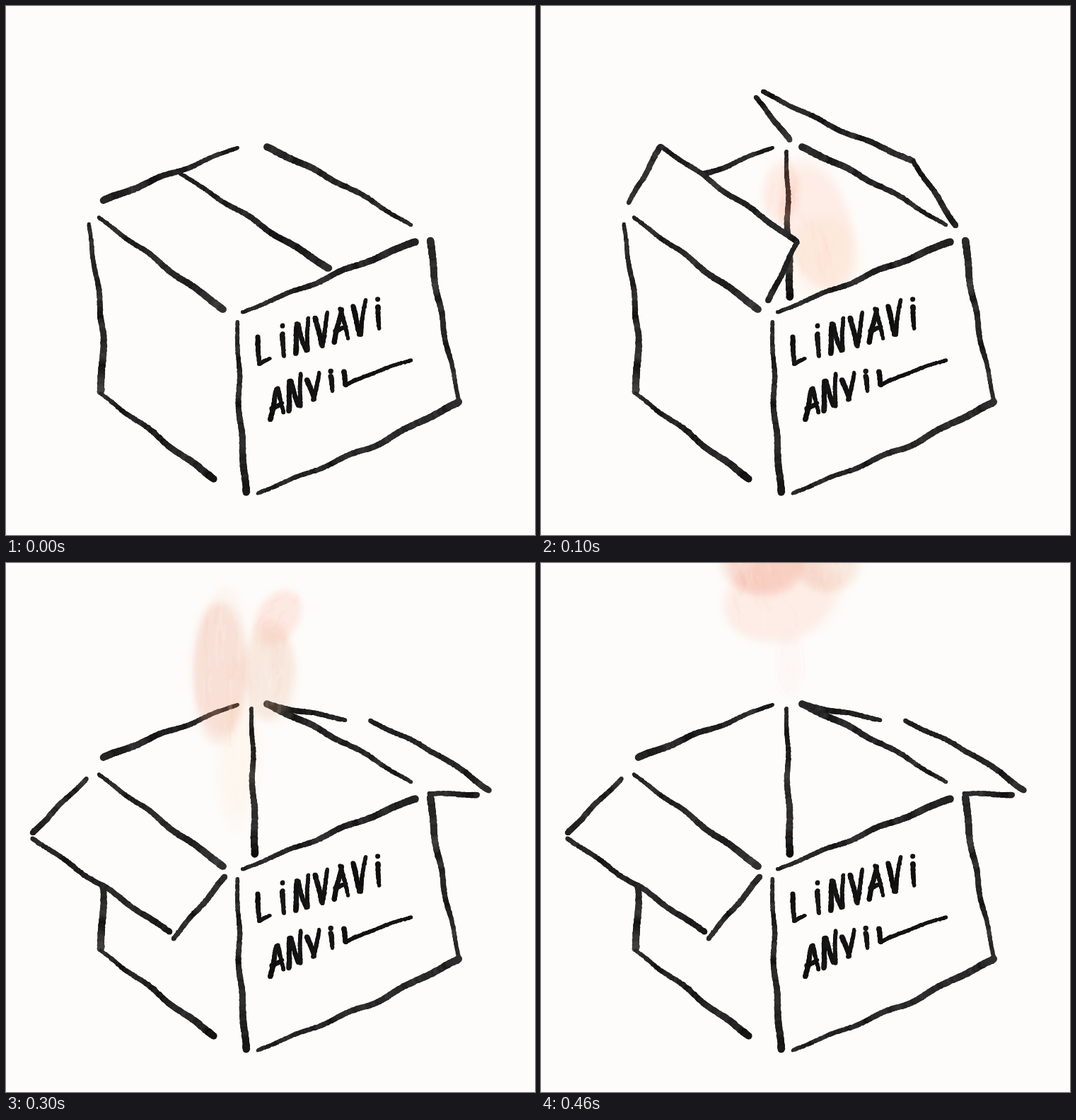
These frames come from a looping animation (748 by 748 pixels, 0.5 s). An HTML page with a canvas:

```html
<!DOCTYPE html>
<html lang="en">
<head>
<meta charset="utf-8">
<title>Opening box</title>
<style>
  html, body { margin: 0; height: 100%; overflow: hidden; background: #fdfcfa; }
  canvas { display: block; }
</style>
</head>
<body>
<canvas id="stage" width="748" height="748" role="img" aria-label="A box marked Linvavi Anvil opens"></canvas>
<script>
const SIZE = 748, STEP = 100, PAPER = '#fdfcfa';

// Brush lines as x, y pairs, from the thin end to the thick end.
const back = [
  [328,200, 137,275],
  [573,310, 480,254, 369,199],
  [117,308, 138,460, 134,546]
];
const front = [
  [131,299, 307,429],
  [335,433, 579,333],
  [134,548, 294,669],
  [327,447, 331,590, 340,688],
  [640,557, 610,412, 600,331],
  [356,689, 520,622, 640,560]
];
const seam = [245,236, 456,371], inner = [347,206, 352,412], hinge = [307,429, 131,299];

// The left lines run around the flap, so they also outline what it hides.
const closed = { left: [], right: [] };
const ajar = {
  left: [[124,278, 169,198], [169,198, 362,333], [362,334, 321,417]],
  right: [[314,121, 400,165, 526,219], [304,129, 352,189], [526,219, 586,310]]
};
const wide = {
  left: [[118,283, 73,201], [79,198, 267,329], [267,329, 312,427]],
  right: [[438,107, 362,184], [453,107, 676,236], [673,239, 602,316]]
};
const folded = {
  left: [[114,305, 37,382], [38,390, 232,522], [237,531, 309,444]],
  right: [[480,222, 369,200], [515,223, 615,272, 683,322], [598,326, 667,328]]
};
const poses = [closed, ajar, wide, folded, folded];

// Smoke dabs: x, y, half width, half height, tilt, strength.
const smoke = [
  [],
  [[340,262, 28,48, 0.1, .13], [388,310, 48,95, -0.25, .13], [405,360, 55,65, 0, .08]],
  [[340,155, 30,38, 0, .05], [348,210, 52,52, 0, .14], [325,280, 45,80, 0.3, .12],
   [388,320, 60,90, -0.3, .11]],
  [[306,150, 38,107, 0, .3], [386,78, 30,46, 0.6, .2], [372,155, 38,70, 0, .22],
   [330,280, 30,95, 0, .05]],
  [[312,2, 56,44, 0, .4], [405,5, 46,36, 0, .22], [345,48, 86,60, -0.2, .14],
   [352,140, 20,48, 0, .035]]
];

// Hand lettering on a unit square.
const glyphs = {
  L: [[0,1, 0.1,0, 0.9,0.1]],
  I: [[0.4,0.75, 0.5,0], [0.4,1, 0.45,1]],
  N: [[0,0, 0.1,1, 0.8,0, 0.9,1.1]],
  V: [[0,1, 0.5,0, 0.9,1.1]],
  A: [[0,0, 0.5,1, 1,0], [0.1,0.35, 0.9,0.4]]
};

function seeded(seed) {
  return () => (seed = (seed * 16807 + 11) % 2147483647) / 2147483647;
}

function tracePolygon(g, pts) {
  g.beginPath();
  for (let i = 0; i < pts.length; i += 2) g.lineTo(pts[i], pts[i + 1]);
  g.closePath();
}

// A rough brush line: overlapping dabs that waver in place, size and tone.
function ink(g, pts, w0, w1, tone = 38, spread = 26) {
  const random = seeded(Math.round(pts[0] * 751 + pts[1] * 13) + 7);
  const phase = random() * 6, lengths = [];
  for (let i = 2; i < pts.length; i += 2)
    lengths.push(Math.hypot(pts[i] - pts[i - 2], pts[i + 1] - pts[i - 1]));
  const total = lengths.reduce((a, b) => a + b), waver = Math.min(1.7, total / 80);
  let done = 0, shade = tone;
  lengths.forEach((length, k) => {
    const [x0, y0, x1, y1] = pts.slice(2 * k, 2 * k + 4);
    const dx = (x1 - x0) / length, dy = (y1 - y0) / length;
    for (let d = 0; d < length; d += 0.9) {
      const s = done + d, width = w0 + (w1 - w0) * s / total;
      const off = waver * Math.sin(s / 14 + phase) * Math.sin(Math.PI * s / total);
      shade += (tone - shade) * 0.1 + (random() - 0.5) * spread * 0.5;
      const v = Math.max(12, shade | 0);
      g.fillStyle = `rgb(${v},${v},${v})`;
      g.beginPath();
      g.arc(x0 + dx * d - dy * off + (random() - 0.5) * 0.9,
            y0 + dy * d + dx * off + (random() - 0.5) * 0.9,
            width / 2 + (random() - 0.5) * 0.7, 0, 7);
      g.fill();
    }
    done += length;
  });
}

// Letters climb along a slope, from height h0 to h1.
function letter(g, word, x, y, slope, advance, h0, h1) {
  const random = seeded(word.length * 41);
  [...word].forEach((char, i) => {
    const height = (h0 + (h1 - h0) * i / (word.length - 1)) * (0.92 + random() * 0.2);
    const left = x + i * advance, width = advance * 0.72;
    glyphs[char].forEach(stroke => {
      const pts = stroke.map((v, j) => j % 2
        ? y + slope * (i * advance + stroke[j - 1] * width) - v * height
        : left + v * width);
      ink(g, pts, 7, 5, 20, 10);
    });
  });
}

// A soft watercolour dab: layered ellipses with dry brush streaks.
function wash(g, [x, y, rx, ry, tilt, strength]) {
  const random = seeded(x * 97 + y * 31 + 5), around = n => (random() - 0.5) * n;
  g.save();
  g.translate(x, y);
  g.rotate(tilt);
  g.filter = 'blur(4px)';
  g.fillStyle = `rgba(234,158,125,${strength / 5})`;
  for (let i = 0; i < 5; i++) {
    g.beginPath();
    g.ellipse(around(rx * 0.3), around(ry * 0.2), rx * (0.85 + random() * 0.2),
              ry * (0.85 + random() * 0.2), around(0.2), 0, 7);
    g.fill();
  }
  g.filter = 'blur(1px)';
  g.lineCap = 'round';
  for (let i = 0; i < 18; i++) {
    const a = random() * 6.28, r = Math.sqrt(random()) * 0.85;
    const sx = Math.cos(a) * r * rx, sy = Math.sin(a) * r * ry, reach = ry * (0.1 + random() * 0.2);
    g.strokeStyle = i % 2 ? `rgba(234,158,125,${strength * 0.22})` : `rgba(253,252,250,${strength * 0.6})`;
    g.lineWidth = 1 + random() * 5;
    g.beginPath();
    g.moveTo(sx, sy - reach);
    g.quadraticCurveTo(sx + around(14), sy, sx + around(12), sy + reach);
    g.stroke();
  }
  g.restore();
}

function paint(pose, index) {
  const sheet = document.createElement('canvas');
  sheet.width = sheet.height = SIZE;
  const g = sheet.getContext('2d');
  const edges = lines => lines.forEach(pts => ink(g, pts, 5, 10));
  const flap = lines => lines.forEach(pts => ink(g, pts, 6, 8));
  g.fillStyle = PAPER;
  g.fillRect(0, 0, SIZE, SIZE);

  edges([...back, index ? inner : seam]);
  flap(pose.right);

  g.save();
  tracePolygon(g, [0,0, SIZE,0, SIZE,264, 335,433, ...hinge, 0,203]);
  g.clip();
  smoke[index].forEach(dab => wash(g, dab));
  g.restore();

  if (pose.left.length) {
    g.fillStyle = PAPER;
    tracePolygon(g, [...pose.left.flat(), ...hinge]);
    g.fill();
  }
  flap(pose.left);
  edges(front);

  letter(g, 'LINVAVI', 356, 507, -0.29, 27, 42, 42);
  letter(g, 'ANVIL', 374, 584, -0.45, 26, 42, 22);
  ink(g, [492,530, 530,514, 573,501], 5, 5, 20, 10);
  return sheet;
}

const sheets = poses.map(paint);
const stage = document.getElementById('stage').getContext('2d');

function show() {
  const index = Math.floor(performance.now() / STEP) % sheets.length;
  stage.drawImage(sheets[index], 0, 0);
  requestAnimationFrame(show);
}
show();
</script>
</body>
</html>
```
